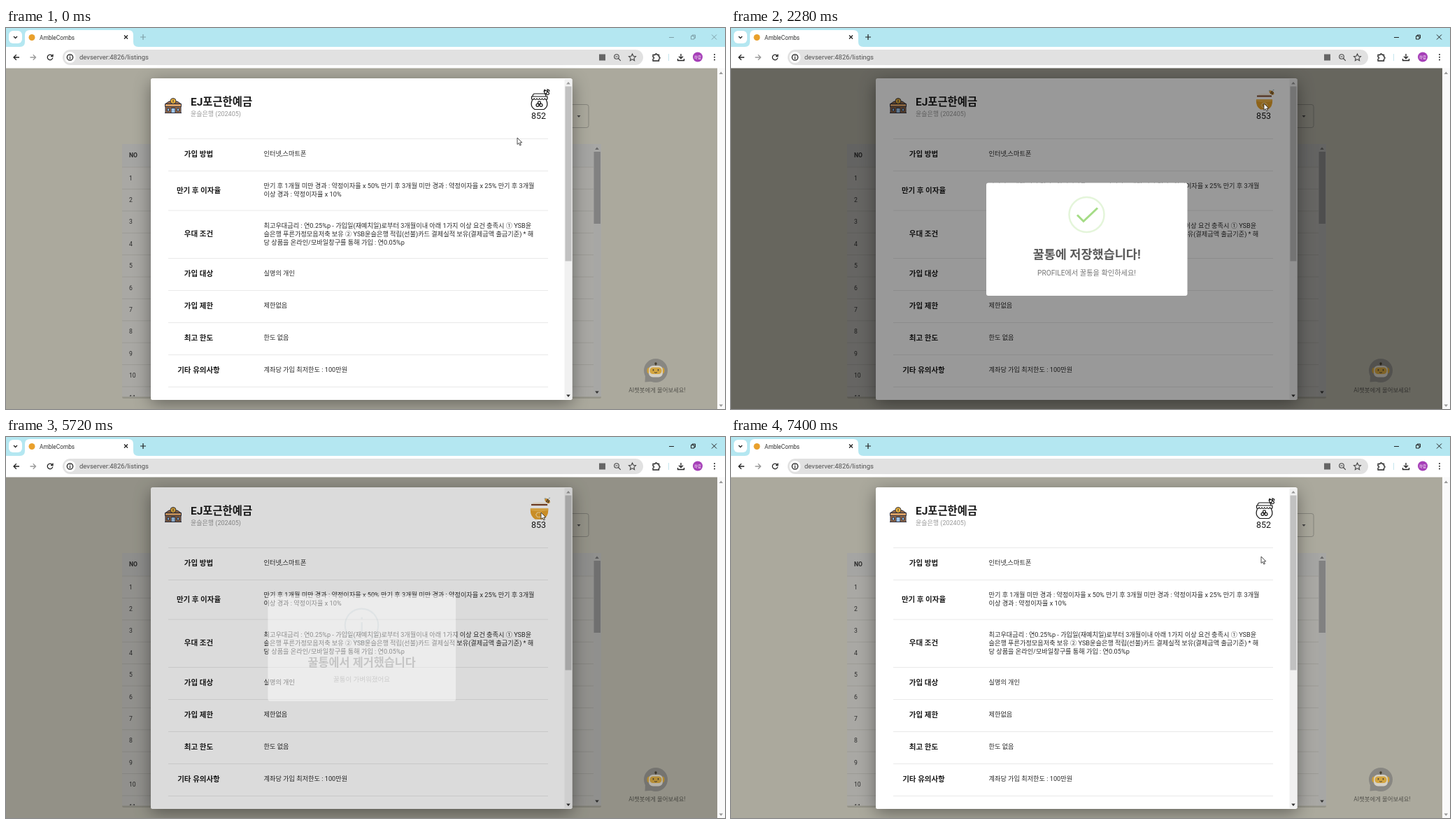
Write an HTML page that moves like this. It is 1028 px wide and 545 px high and loops after 8.27 s.

```html
<!DOCTYPE html>
<html lang="ko">
<head>
<meta charset="utf-8">
<title>Deposit details</title>
<style>
html, body { margin: 0; width: 100%; height: 100%; overflow: hidden; background: #fff; }
svg { display: block; }
text { font-family: Roboto, "Noto Sans CJK KR", sans-serif; white-space: pre; }
.mid { text-anchor: middle; }
.bold { font-weight: 700; }
.line { fill: none; stroke: #222; stroke-width: 1.3; }
#modal { filter: drop-shadow(0 6px 12px #0006); }
</style>
</head>
<body>
<svg width="1028" height="545" viewBox="0 0 1028 545">
  <!-- browser frame -->
  <rect width="1028" height="28" fill="#b4e7f1"/>
  <rect y="27" width="1028" height="31" fill="#fff"/>
  <rect x="4" y="4" width="19" height="18" rx="6" fill="#fff"/>
  <path class="line" d="M11 12l2.500 2.500 2.500-2.500"/>
  <path d="M20 27q7 0 7-7v-10q0-7 7-7h141q7 0 7 7v10q0 7 7 7z" fill="#fff"/>
  <circle cx="37" cy="13.500" r="4.500" fill="#e9a02c"/>
  <text x="48" y="17" font-size="8.300" fill="#333">AmbleCombs</text>
  <path class="line" d="M169 10.500l5 5m0-5l-5 5"/>
  <g id="controls" fill="none">
    <path d="M192 13h8m-4-4v8" stroke-width="1.200"/>
    <path d="M948 13.500h7M979.500 11.500h4.500v4.500h-4.500zM981 11.500v-1.500h4.500v4.500h-1.500M1009 9.500l7 7m0-7l-7 7"/>
  </g>
  <path class="line" d="M19 42h-8m3.800-3.800l-3.800 3.800 3.800 3.800"/>
  <path class="line" style="stroke:#999" d="M34.500 42h8m-3.800-3.800l3.800 3.800-3.800 3.800"/>
  <path class="line" d="M66 39.500a3.800 3.800 0 1 0 .8 3M67 37.500v3h-3"/>
  <rect x="81" y="31" width="830" height="22" rx="11" fill="#e1e1e1"/>
  <circle cx="91.500" cy="42" r="8" fill="#fff"/>
  <circle class="line" cx="91.500" cy="42" r="4.200"/>
  <path class="line" d="M91.500 41.500v3m0-5.200v1.200"/>
  <text x="105" y="45.300" font-size="9.500" fill="#505050">devserver:4826/listings</text>
  <rect x="848" y="37.500" width="9" height="9" fill="#666"/>
  <g class="line" style="stroke:#444;stroke-width:1.100">
    <circle cx="873" cy="41" r="3.300"/><path d="M875.500 43.500l3.300 3.300M871.500 41h3"/>
    <path d="M895.500 37l1.500 3.300 3.500.4-2.600 2.400.7 3.500-3.100-1.800-3.100 1.800.7-3.500-2.600-2.400 3.500-.4z"/>
  </g>
  <path class="line" d="M925 38.500h3a1.500 1.500 0 0 1 3 0h2.500v2.800a1.500 1.500 0 0 1 0 3v2.700h-8.500v-2.700a1.500 1.500 0 0 0 0-3z"/>
  <path d="M947.500 37v10" stroke="#c5e6ee"/>
  <path class="line" d="M965 37v6.500m-3-2.800l3 3 3-3M960.500 44v2.500h9v-2.500"/>
  <circle cx="989" cy="41.500" r="7" fill="#a63fb8"/>
  <text class="mid" x="989" y="43.500" font-size="5.500" fill="#fff">하람</text>
  <path d="M1013 38v.01m0 3.700v.01m0 3.700v.01" stroke="#222" stroke-width="2" stroke-linecap="round"/>

  <!-- page -->
  <rect y="57.500" width="1017" height="488" fill="#aba99d"/>
  <rect x="1017" y="57.500" width="11" height="488" fill="#fafafa"/>
  <path d="M1019.500 66l2.800-3.500 2.800 3.500zM1019.500 538.500l2.800 3.500 2.800-3.500z" fill="#999"/>
  <rect x="780" y="109.500" width="53" height="33" rx="3" fill="none" stroke="#85847c"/>
  <path d="M816.500 125h5l-2.500 3z" fill="#444"/>
  <rect x="166" y="167" width="685" height="363" rx="2" fill="#0002"/>
  <rect x="166" y="166" width="685" height="361.500" fill="#a9a8a4"/>
  <rect x="166" y="166" width="674" height="33" fill="#a5a5a3"/>
  <clipPath id="tableClip"><rect x="166" y="166" width="685" height="361"/></clipPath>
  <g id="table" clip-path="url(#tableClip)" font-size="8.600" fill="#2b2b2b"></g>
  <rect x="840" y="166" width="10.500" height="361" fill="#a7a7a5"/>
  <rect x="840.500" y="177" width="9.500" height="103" fill="#818181"/>
  <path d="M842.200 174l2.800-3.500 2.800 3.500z" fill="#666"/>
  <path d="M842.200 519.500l2.800 3.500 2.800-3.500z" fill="#333"/>

  <!-- chat helper -->
  <circle cx="929" cy="490" r="17" fill="#888782"/>
  <path d="M914 497l-.5 9.500 11-1z" fill="#888782"/>
  <path d="M929 484v-3.500" stroke="#443c2c"/>
  <circle cx="929" cy="480" r="1.700" fill="#443c2c"/>
  <rect x="916.500" y="485.500" width="25" height="9" rx="4" fill="#d0a037"/>
  <rect x="919" y="483" width="20" height="16.500" rx="6" fill="#d4d0c6"/>
  <rect x="920.500" y="485.500" width="17" height="9.500" rx="4.500" fill="#d3a540"/>
  <path d="M925.500 488v2.500m7-2.500v2.500" stroke="#4b4436" stroke-width="1.500"/>
  <path d="M927 492.500q2 1.500 4 0" stroke="#4b4436" fill="none"/>
  <text class="mid" x="931" y="521.300" font-size="8.400" fill="#55544e">AI챗봇에게 물어보세요!</text>

  <!-- detail window -->
  <rect id="modal" x="207" y="72" width="602.500" height="460" rx="2.500" fill="#fff"/>
  <rect x="798.500" y="73" width="11" height="458" fill="#f1f1f1"/>
  <rect x="799.500" y="83.500" width="9" height="250" fill="#c1c1c1"/>
  <path d="M801.200 80.500l2.800-3.500 2.800 3.500z" fill="#999"/>
  <path d="M801.200 524.500l2.800 3.500 2.800-3.500z" fill="#333"/>
  <g stroke="#2c2d3c">
    <path d="M228 108.500l5-3.500h12l5 3.500v13h-22z" fill="#9a6d49"/>
    <path d="M227.500 108.500h23v4h-23z" fill="#d9a066"/>
    <circle cx="239" cy="104.500" r="4" fill="#f0b63c"/>
    <path d="M239 102.500v4M227 121.500h24" fill="none"/>
    <path d="M236 114.500h6v7h-6zM230.500 115h3v4h-3zM244.500 115h3v4h-3z" fill="#9fc5e8"/>
  </g>
  <text class="bold" x="264" y="110.800" font-size="15.400" fill="#1b1b1b">EJ포근한예금</text>
  <text x="264" y="125.500" font-size="9" fill="#999">윤슬은행 (202405)</text>
  <g id="rows"></g>

  <g id="jar">
    <g id="empty" fill="none" stroke="#151515" stroke-width="1.200">
      <path d="M753 98q0-4 3-4h13q3 0 3 4zM751.500 98h22.500v3q-1 3-3.700 0-1.900 3-3.800 0-1.900 3-3.700 0-1.900 3-3.800 0-1.900 3-3.700 0-2.800 3-3.800 0z"/>
      <path d="M752.500 103q-4 9 3.500 13.500h13q7.500-4.500 3.500-13.500"/>
      <circle cx="762.500" cy="106.800" r="2"/><circle cx="760" cy="110.300" r="2"/><circle cx="765" cy="110.300" r="2"/>
      <ellipse cx="773" cy="92.500" rx="3.800" ry="2.200" transform="rotate(35 773 92.500)"/>
      <path d="M772 94.500l2.500-4M769 91l1-2.500 2.500 1.500M774.500 90.500l-.5-2.500 2.500 1 .5 2"/>
    </g>
    <g id="honey">
      <path d="M754 94.500q8.500-1 17 0v2.500h-17z" fill="#faf3e4"/>
      <path d="M752 97.500h21" stroke="#7d4529" stroke-width="2"/>
      <path d="M751 102h23q1 10-6 14.500h-11q-7-4.500-6-14.500z" fill="#eaa42c"/>
      <path d="M751 102h23l-.2 2.500q-11 3-22.600 0z" fill="#f4b94b"/>
      <path d="M760 107.500h5l2 3-2 3h-5l-2-3z" fill="none" stroke="#fbe0a0"/>
      <ellipse cx="773" cy="92.500" rx="4" ry="2.300" fill="#e3a03a" transform="rotate(40 773 92.500)"/>
      <path d="M771.500 94l2.500-4M773.500 95l2-3.500" stroke="#46382c" stroke-width="1.200"/>
      <path d="M769 90.500q-1-2.500 2.500-1.500zM774.500 90q0-3 2.500-1.500z" fill="#91b4bd"/>
    </g>
  </g>
  <text id="count" class="mid" x="761.500" y="130" font-size="12.500" fill="#151515"></text>

  <!-- alert -->
  <rect id="dim" y="57.500" width="1017" height="488"/>
  <g id="popup">
    <rect x="365" y="221.500" width="287.500" height="161.500" rx="3" fill="#fff"/>
    <g id="content">
      <g id="saved" fill="none" stroke="#a5dc86">
        <circle id="ring" cx="508.500" cy="267" r="25" stroke-opacity=".3"/>
        <path id="check" d="M495 267.500l9 9 20-19" pathLength="1" stroke-dasharray="1 2" stroke-width="3"/>
      </g>
      <g id="removed" fill="none" stroke="#c9dae1">
        <circle cx="508.500" cy="267" r="25.400" stroke-width="2.200"/>
        <path d="M508.700 262.500v18.500m0-26.500v3" stroke-width="2.500"/>
      </g>
      <text id="heading" class="mid bold" x="508.700" y="330.300" font-size="17.500" fill="#595959"></text>
      <text id="note" class="mid" x="508.500" y="353.500" font-size="10.200" fill="#777"></text>
    </g>
  </g>
  <path id="cursor" d="M0 0v9.500l2.200-2 1.600 3.500 1.600-.7-1.600-3.400h3z" fill="#fff" stroke="#222" stroke-width=".8"/>
</svg>
<script>
const $ = id => document.getElementById(id);
const set = (id, name, value) => $(id).setAttribute(name, value);
const show = (id, on) => set(id, 'visibility', on ? 'visible' : 'hidden');

// table behind the window
let html = '<text class="bold" x="176" y="185">NO</text>';
for (let i = 0; i < 11; i++) {
  const y = 199 + 31.4 * i;
  html += `<path d="M166 ${y}H840" stroke="#9b9a95"/><text x="176" y="${y + 18.5}">${i + 1}</text>`;
}
$('table').innerHTML = html;

// [top line, label, text lines]
const rows = [
  [158.5, '가입 방법', '인터넷,스마트폰'],
  [204.5, '만기 후 이자율', '만기 후 1개월 미만 경과 : 약정이자율 x 50% 만기 후 3개월 미만 경과 : 약정이자율 x 25% 만기 후 3개월', '이상 경과 : 약정이자율 x 10%'],
  [261, '우대 조건', '최고우대금리 : 연0.25%p - 가입일(재예치일)로부터 3개월이내 아래 1가지 이상 요건 충족시 ① YSB윤',
    '슬은행 푸른가정모음저축 보유 ② YSB윤슬은행 적립(선불)카드 결제실적 보유(결제금액 출금기준) * 해',
    '당 상품을 온라인/모바일창구를 통해 가입 : 연0.05%p'],
  [329.5, '가입 대상', '실명의 개인'],
  [375.5, '가입 제한', '제한없음'],
  [421.5, '최고 한도', '한도 없음'],
  [467.5, '기타 유의사항', '계좌당 가입 최저한도 : 100만원'],
  [513.5, '']
];
$('rows').innerHTML = rows.map(([y, label, ...lines]) =>
  `<path d="M232 ${y}H775" stroke="#e9e9e9"/>
   <text class="mid bold" x="275.500" y="${y + 19 + 6 * lines.length}" font-size="10.500" fill="#1b1b1b">${label}</text>` +
  lines.map((line, i) =>
    `<text x="368.500" y="${y + 24.5 + 12.2 * i}" font-size="9.180" fill="#2b2b2b">${line}</text>`).join('')
).join('');

const LOOP = 8270, TICK = LOOP / 84;
const pointer = [[5, 731, 157], [9, 748, 137], [13, 762, 108], [34, 762, 108], [38, 761, 156], [41, 761, 156],
  [45, 759, 151], [46, 759, 151], [52, 765, 108], [70, 765, 108], [75, 758, 171]];
const shade = [[15, 0], [16, .2], [17, .36], [18, .4], [30, .4], [31, .255], [32, .08], [33, 0],
  [56, 0], [57, .03], [58, .14], [59, .3], [60, .4], [68, .4], [69, .255], [70, .08], [71, 0]];
const fade = [[15, 0], [16, .4], [17, .92], [18, 1], [30, 1], [31, .4], [32, 0],
  [57, 0], [58, .48], [59, 1], [68, 1], [69, .4], [70, 0]];
const zoom = [[16, .85], [17, 1], [32, 1], [33, .8], [57, .8], [58, .934], [59, 1.04], [60, .98], [61, 1]];
const hover = [[11, 1], [14, 1.1], [15, 1.1], [16, 1], [49, 1], [52, 1.1], [58, 1.1], [59, 1]];

function at(keys, n) {
  const i = keys.findIndex(k => k[0] >= n);
  if (i < 0) return keys[keys.length - 1].slice(1);
  if (!i) return keys[0].slice(1);
  const a = keys[i - 1], b = keys[i], p = (n - a[0]) / (b[0] - a[0]);
  return a.slice(1).map((v, j) => v + (b[j + 1] - v) * p);
}
const scaleAt = (x, y, s) => `translate(${x} ${y}) scale(${s}) translate(${-x} ${-y})`;

function draw(t) {
  const n = Math.max(0, Math.floor((t - 9) / TICK));
  const saved = n >= 16 && n < 59, firstAlert = n < 40;
  set('controls', 'stroke', n < 13 ? '#7fa0a8' : '#222');
  set('cursor', 'transform', `translate(${at(pointer, n)})`);
  set('jar', 'transform', scaleAt(762, 103, at(hover, n)));
  show('honey', saved && n > 17);
  show('empty', !saved);
  $('count').textContent = saved ? 853 : 852;
  set('dim', 'opacity', at(shade, n));
  set('popup', 'opacity', at(fade, n));
  set('content', 'opacity', at(fade, n));
  set('popup', 'transform', scaleAt(508.7, 302.2, at(zoom, n)));
  show('saved', firstAlert);
  show('removed', !firstAlert);
  set('ring', 'stroke-width', n < 18 ? 1 : 2.5);
  set('check', 'stroke-dashoffset', at([[18, 1.1], [22, 0]], n));
  $('heading').textContent = firstAlert ? '꿀통에 저장했습니다!' : '꿀통에서 제거했습니다';
  $('note').textContent = firstAlert ? 'PROFILE에서 꿀통을 확인하세요!' : '꿀통이 가벼워졌어요';
}

const start = performance.now();
(function frame() {
  draw((performance.now() - start) % LOOP);
  requestAnimationFrame(frame);
})();
</script>
</body>
</html>
```
